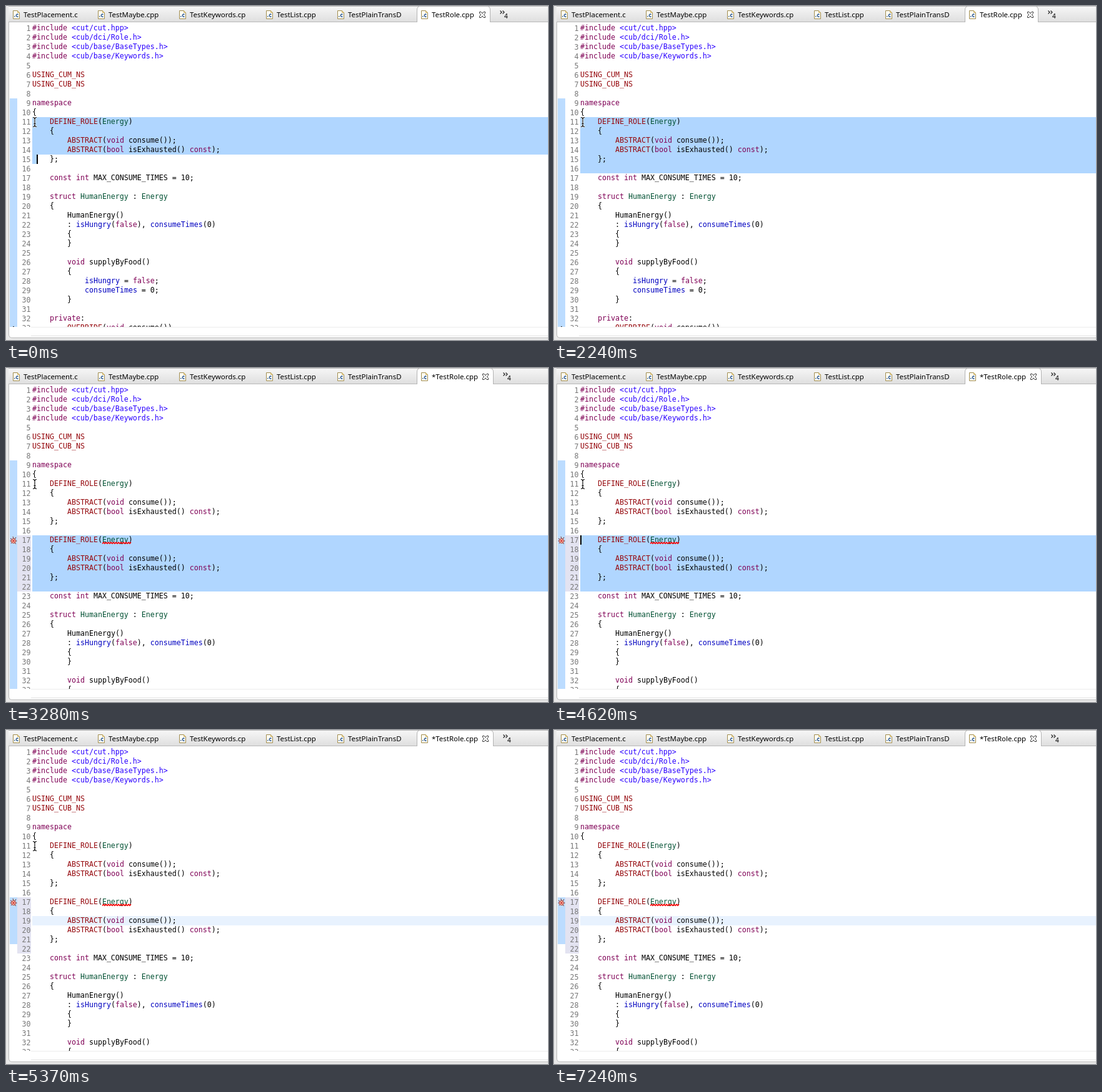
Animation of 867 by 535 pixels, one loop 7340 ms. Source, as an HTML page:

```html
<!DOCTYPE html>
<html lang="en">
<head>
<meta charset="utf-8">
<title>Code editor</title>
<style>
html, body { margin: 0; width: 100%; height: 100%; overflow: hidden; background: #ececec; }
svg { display: block; width: 867px; height: 535px; }
text { white-space: pre; }
.code text { font: 11.627px "DejaVu Sans Mono", monospace; }
.tabs text { font: 11.45px "Noto Sans", sans-serif; }
.num { fill: #787878; text-anchor: end; }
.key { fill: #7f0055; }
.str { fill: #2a00ff; }
.macro { fill: #960a0f; }
.type { fill: #005032; }
.field { fill: #0000c0; }
</style>
</head>
<body>
<svg id="stage" viewBox="0 0 867 535"></svg>
<script>
(() => {
const LOOP = 7340, ROW = 15, LEFT = 42, RIGHT = 867, CHAR = 7;
const stage = document.getElementById('stage');

const role = `    DEFINE_ROLE(Energy)
    {
        ABSTRACT(void consume());
        ABSTRACT(bool isExhausted() const);
    };
`.split('\n');

const head = `#include <cut/cut.hpp>
#include <cub/dci/Role.h>
#include <cub/base/BaseTypes.h>
#include <cub/base/Keywords.h>

USING_CUM_NS
USING_CUB_NS

namespace
{`.split('\n');

const tail = `    const int MAX_CONSUME_TIMES = 10;

    struct HumanEnergy : Energy
    {
        HumanEnergy()
        : isHungry(false), consumeTimes(0)
        {
        }

        void supplyByFood()
        {
            isHungry = false;
            consumeTimes = 0;
        }

    private:
        OVERRIDE(void consume())`.split('\n');

// Time, line, column; no line means the caret is hidden.
const carets = [
  [0, 15, 1], [450, 15], [600, 16], [900, 17], [1190], [1640, 17], [2240],
  [2390, 17], [3140], [3580, 17], [4170], [4620, 17], [4770, 18], [4920, 19],
  [5370], [5820, 19], [6260], [6860, 19], [7240]
];
const pointers = [
  [0, 46, 186], [5670, 130, 236], [5820, 330, 362], [5970, 500, 454], [6110, 563, 488], [6260]
];

const at = (steps, t) => steps.filter(s => s[0] <= t).pop();
const rowTop = line => 28 + ROW * (line - 1);
const rect = (x, y, w, h, fill) =>
  `<rect x="${x}" y="${y}" width="${w}" height="${h}" fill="${fill}"/>`;
const path = (d, stroke, width = 1, fill = 'none') =>
  `<path d="${d}" stroke="${stroke}" stroke-width="${width}" fill="${fill}"/>`;
const label = (x, y, s, more = '') => `<text x="${x}" y="${y}" ${more}>${s}</text>`;
const encode = s => s.replace(/&/g, '&amp;').replace(/</g, '&lt;').replace(/>/g, '&gt;');

const syntax = new RegExp([
  '(?<str><[^>]+>)',
  '(?<key>#include|\\b(?:namespace|const|int|struct|void|bool|false|private)\\b)',
  '(?<macro>\\b(?:USING_\\w+|DEFINE_ROLE|ABSTRACT|OVERRIDE)\\b)',
  '(?<type>\\b(?:Human)?Energy\\b(?!\\())',
  '(?<field>\\b(?:isHungry|consumeTimes)\\b)'
].join('|'), 'g');

function codeLine(source, line, plain) {
  const code = source.trimStart();
  let out = '', end = 0;
  for (const m of code.matchAll(syntax)) {
    const kind = Object.keys(m.groups).find(k => m.groups[k]);
    const word = encode(m[0]);
    out += encode(code.slice(end, m.index));
    out += plain && kind !== 'key' ? word : `<tspan class="${kind}">${word}</tspan>`;
    end = m.index + m[0].length;
  }
  out += encode(code.slice(end));
  return label(LEFT + (source.length - code.length) * CHAR, rowTop(line) + 11, out);
}

const fileIcon = x =>
  path(`M${x + .5} 7.5h7l3 3v10h-10z`, '#a08c50', 1, '#fffdf2') +
  path(`M${x + 7.5} 7.5v3h3`, '#c8ad62', 1, '#f2dfa0') +
  rect(x + 2, 16, 1.5, 1.5, '#315f9e') +
  path(`M${x + 8.5} 13.6a2 2 0 1 0 0 3.2`, '#315f9e', 1.5);

function tabs(dirty) {
  const shift = dirty ? 5 : 0, edge = 774 + shift, x = 757 + shift;
  const names = [
    [11, 'TestPlacement.c'], [147, 'TestMaybe.cpp'], [277, 'TestKeywords.cp'],
    [416, 'TestList.cpp'], [530, 'TestPlainTransD'],
    [664, (dirty ? '*' : '') + 'TestRole.cpp']
  ];
  return '<g class="tabs">' +
    rect(4, 1, 863, 25, 'url(#bar)') +
    path('M4 .5H867M4 25.5H867', '#b8b8b8') +
    path(`M657.5 26V6q0-5.5 5.5-5.5H${edge - 5}q5.5 0 5.5 5.5V26`, '#b4b4b4', 1, '#fff') +
    names.map(([left, name]) => fileIcon(left) + label(left + 17, 18, name)).join('') +
    path(`M${x + .5} 9.5h2.5l2 2.5 2-2.5h2.5v2l-2 2.5 2 2.5v2h-2.5l-2-2.5-2 2.5h-2.5v-2l2-2.5-2-2.5z`, '#333', 1, '#fff') +
    path(`M${790.5 + shift} 7.5l2.5 2.5-2.5 2.5m4-5l2.5 2.5-2.5 2.5`, '#222', 1.2) +
    label(797 + shift, 20, '4', 'style="font-size:10px"') + '</g>';
}

const errorMark = () =>
  path('M7 273l3 2M6.5 277h3M8 281l2-2M11 270l1 3M16 271l-2 3M17.5 277h-3M16 282l-2-2', '#7c2a22') +
  '<circle cx="12" cy="277" r="3.6" fill="#f3c9b4" stroke="#b53a30"/>' +
  path('M10.3 275.3l3.4 3.4m0-3.4l-3.4 3.4', '#d0282c', 1.2);

function squiggle() {
  let d = 'M154 281.5';
  for (let x = 156; x <= 200; x += 2) d += `L${x} ${x % 4 ? 281.5 : 279}`;
  return path(d, '#f00', 1.4);
}

function ibeam(x, y) {
  const d = `M${x - 3} ${y - 7.5}q3 0 3 2.5q0-2.5 3-2.5M${x} ${y - 5}v10` +
    `M${x - 3} ${y + 7.5}q3 0 3-2.5q0 2.5 3 2.5M${x - 1.5} ${y + 2.5}h3`;
  return path(d, '#fff', 2.6) + path(d, '#000', 1.1);
}

function selection(t) {
  const rows = (a, b) => rect(LEFT, rowTop(a), RIGHT - LEFT, ROW * (b - a + 1), '#b0d6ff');
  if (t < 600) return rows(11, 14) + (t < 450 ? rect(LEFT, rowTop(15), CHAR, ROW, '#b0d6ff') : '');
  if (t < 2390) return rows(11, t < 900 ? 15 : 16);
  if (t < 4770) return rows(17, 22);
  return rect(LEFT, rowTop(t < 4920 ? 18 : 19), RIGHT - LEFT, ROW, '#e8f2fe');
}

function draw(t) {
  const pasted = t >= 2390, dirty = t >= 2540, plain = t < 2990, failed = t >= 3280;
  const lines = [...head, ...role, ...(pasted ? role : []), ...tail].slice(0, 33);
  const [, line, col = 0] = at(carets, t);
  const [, px, py] = at(pointers, t);

  stage.innerHTML =
    `<defs><linearGradient id="bar" x2="0" y2="1"><stop stop-color="#f6f6f6"/><stop offset="1" stop-color="#dedede"/></linearGradient>
    <clipPath id="view"><rect y="26" width="867" height="488"/></clipPath></defs>` +
    rect(0, 0, 867, 535, '#e9e9e9') +
    path('M868 531.5H10q-5.5 0-5.5-5.5V0H868z', '#b8b8b8', 1, '#fff') +
    tabs(dirty) +
    path('M40 514.5H867', '#ededed') + path('M40 528.5H867', '#e0e0e0') +
    '<g class="code" clip-path="url(#view)">' +
    (t < 5220 ? rect(6, 148, 12, 366, '#bcdcff') : rect(6, 268, 12, 75, '#bcdcff')) +
    (dirty ? rect(18, 268, 22, 90, '#e3e3f1') : '') +
    selection(t) +
    lines.map((s, i) => label(39.5, rowTop(i + 1) + 12, i + 1, 'class="num"') +
      codeLine(s, i + 1, pasted && plain && i > 15 && i < 22)).join('') +
    (pasted ? '' : rect(11, 513, 2, 1, '#333')) +
    (failed ? errorMark() + squiggle() : '') +
    (line ? rect(LEFT + col * CHAR, rowTop(line), 2, ROW, '#000') : '') +
    (px ? ibeam(px, py) : '') + '</g>';
}

const changes = [...new Set([...carets, ...pointers].map(s => s[0]).concat(2540, 2990, 3280, 5220))]
  .sort((a, b) => a - b);
let shown = -1;
function tick() {
  const t = performance.now() % LOOP;
  const now = changes.filter(c => c <= t).pop();
  if (now !== shown) draw(shown = now);
  requestAnimationFrame(tick);
}
tick();
})();
</script>
</body>
</html>
```
